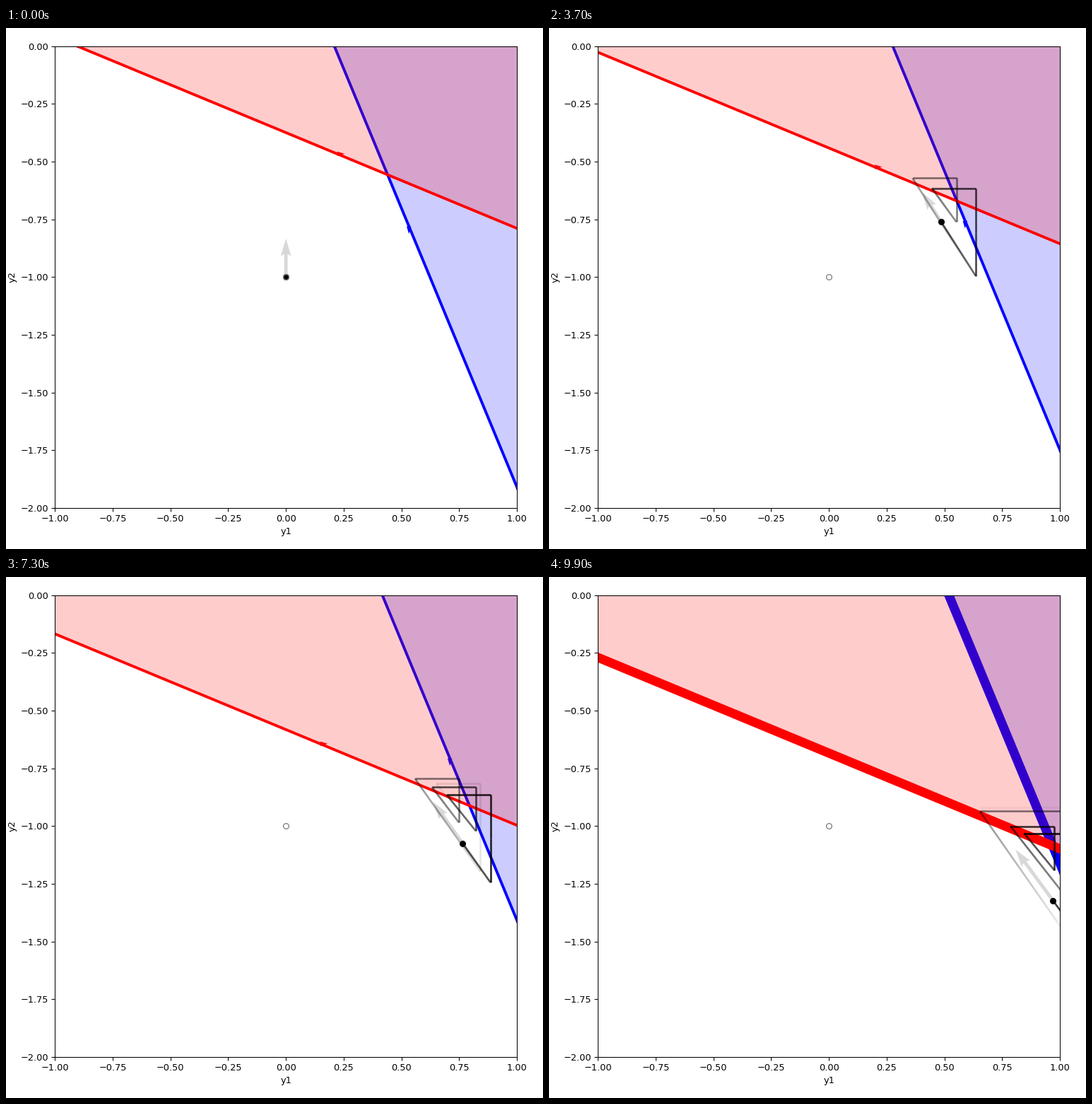
Recreate the animation shown at these times as a matplotlib script. Size 760 by 737 pixels, loop 10 s.

```python
import numpy as np
import matplotlib.pyplot as plt
from matplotlib.animation import FuncAnimation
from matplotlib.collections import LineCollection

W, H, DPI = 760, 737, 93
FRAMES, SUB, DT = 100, 100, 1e-3
FADE = 1000                      # visible trail, in steps
K = np.tan(np.pi / 8)
JUMP = 0.1899
START = np.array([0.0, -1.0])
RED0, BLUE0, RATE = 0.3743, 0.2098, 0.0392
N_RED = np.array([np.sin(np.pi / 8), np.cos(np.pi / 8)])
N_BLUE = N_RED[::-1]


def drift(t):
    return RATE * max(t - 2, 0)


def simulate():
    """Leaky decay to the origin, with a jump whenever a boundary is crossed."""
    steps = FRAMES * SUB
    path = np.empty((steps + 1, 2))
    red, blue = np.zeros(steps, bool), np.zeros(steps, bool)
    path[0] = y1, y2 = START
    for n in range(steps):
        d = drift(n * DT)
        if y1 + K * y2 > BLUE0 + d:
            y2 -= JUMP
            blue[n] = True
        elif y2 + K * y1 > -RED0 - d:
            y1 += JUMP
            red[n] = True
        else:
            y1, y2 = y1 * (1 - DT), y2 * (1 - DT)
        path[n + 1] = y1, y2
    return path, red, blue


path, red_spikes, blue_spikes = simulate()

fig = plt.figure(figsize=(W / DPI, H / DPI), dpi=DPI)
ax = fig.add_axes([69.4 / W, (H - 679.1) / H, 653.5 / W, 653.4 / H])
ax.set(xlim=(-1, 1), ylim=(-2, 0), xlabel="y1", ylabel="y2")


class Boundary:
    def __init__(self, color, normal, kick, spikes, z):
        self.normal, self.spikes = normal, spikes
        self.tangent = np.array([normal[1], -normal[0]])
        self.fill, = ax.fill([0, 1, 1], [0, 0, 1], color=color, alpha=0.2,
                             lw=0, zorder=z)
        self.line, = ax.plot([], [], color=color, lw=3, zorder=z + 0.1)
        self.arrow = ax.quiver([0], [0], [kick[0]], [kick[1]], color=color,
                               scale=12, zorder=z + 0.2)

    def update(self, offset, n):
        base = offset * self.normal + START @ self.tangent * self.tangent
        a, b = base - 4 * self.tangent, base + 4 * self.tangent
        far = 6 * self.normal
        self.fill.set_xy([a, b, b + far, a + far])
        self.line.set_data(*zip(a, b))
        fired = self.spikes[max(n - SUB, 0):n].any()
        self.line.set_linewidth(10 if fired else 3)
        self.arrow.set_offsets([base])


blue = Boundary("blue", N_BLUE, (0, -0.2), blue_spikes, 1.0)
red = Boundary("red", N_RED, (0.2, 0), red_spikes, 1.4)

leak = ax.quiver([0], [-1], [0], [1], color="gray", alpha=0.3, scale=12,
                 zorder=1.8)
trail = LineCollection([], linewidths=2, zorder=2.1)
ax.add_collection(trail, autolim=False)
dot, = ax.plot([], [], "ko", ms=6, zorder=2.2)
ax.plot(*START, "o", ms=6, mfc="none", mec="gray", zorder=2.3)


def draw(i):
    n = i * SUB
    d = drift(n * DT)
    blue.update((BLUE0 + d) * N_RED[1], n)
    red.update(-(RED0 + d) * N_RED[1], n)

    pos = path[n]
    dot.set_data([pos[0]], [pos[1]])
    leak.set_offsets([pos])
    leak.set_UVC([-pos[0]], [-pos[1]])

    pts = path[max(n - FADE, 0):n + 1]
    count = len(pts) - 1
    colors = np.zeros((count, 4))
    colors[:, 3] = 1 - np.arange(count, 0, -1) / FADE
    trail.set_segments(np.stack([pts[:-1], pts[1:]], axis=1))
    trail.set_color(colors)
    return ()


anim = FuncAnimation(fig, draw, frames=FRAMES, interval=100, repeat=True,
                     repeat_delay=0)
plt.show()
```
